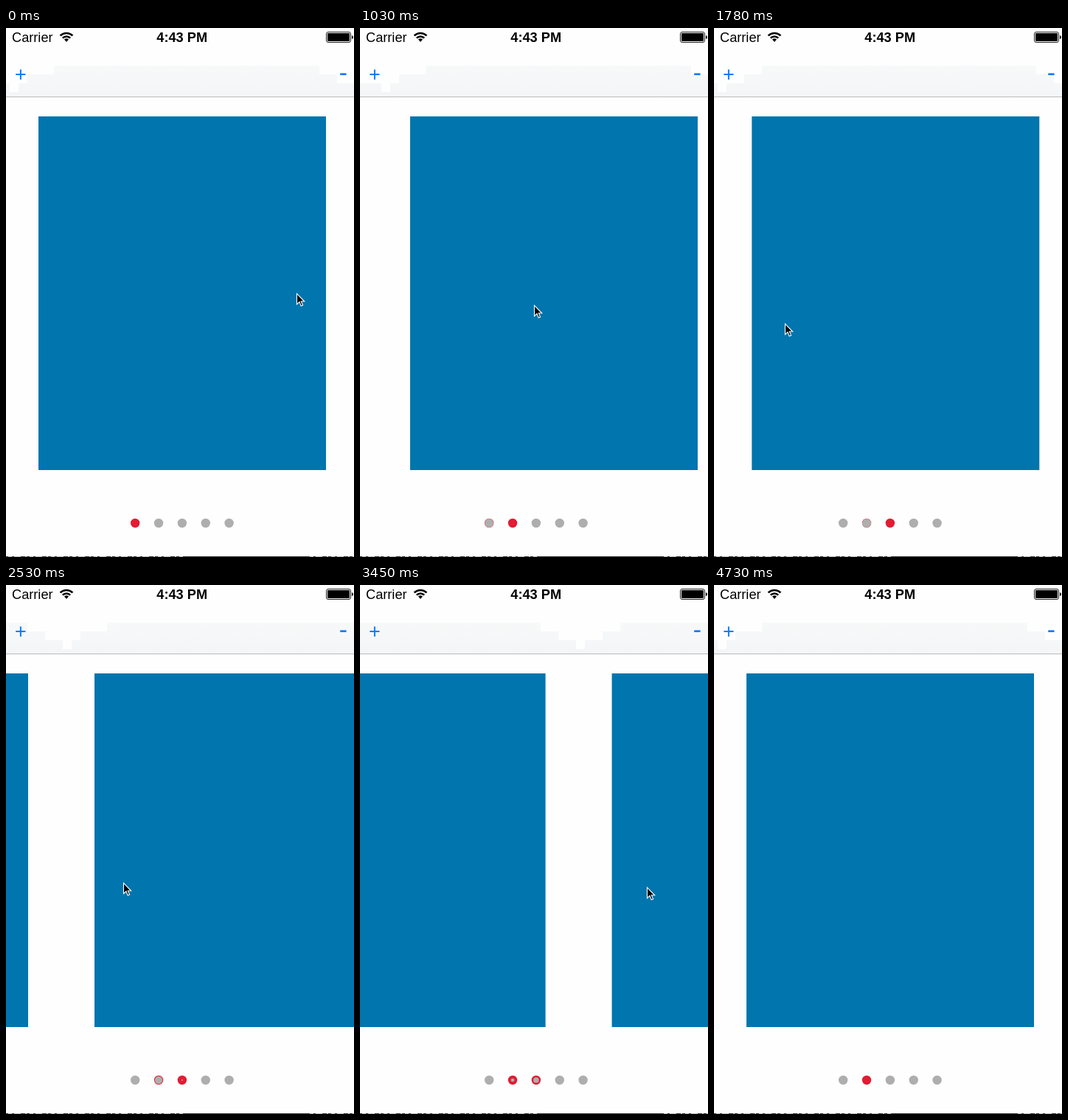
Write an HTML page that moves like this. It is 472 px wide and 718 px high and loops after 4830 ms.

```html
<!DOCTYPE html>
<html lang="en">
<head>
<meta charset="utf-8">
<title>Paged cards</title>
<style>
  html, body { margin: 0; width: 100%; height: 100%; overflow: hidden; background: #fefefe; }
  svg { display: block; }
  text { font-family: "Liberation Sans", Arial, sans-serif; font-size: 18.2px; }
  .button { fill: #007aff; text-anchor: middle; }
  .card { fill: #0075ae; }
  .ring { fill: #e31b33; }
  .core { fill: #aeaeae; }
</style>
</head>
<body>
<svg width="472" height="718" viewBox="0 0 472 718">
  <defs>
    <linearGradient id="bar" x2="0" y2="1">
      <stop stop-color="#f7f9f9"/>
      <stop offset="1" stop-color="#f3f5f7"/>
    </linearGradient>
  </defs>
  <rect width="472" height="718" fill="#fefefe"/>
  <g id="cards"></g>

  <rect y="51" width="472" height="42" fill="url(#bar)"/>
  <path id="glow" fill="#fefefe"/>
  <rect y="93" width="472" height="1" fill="#b9bbbd"/>
  <text class="button" x="20" y="72" style="font-size:27px">+</text>
  <text class="button" x="457.5" y="71.5" style="font-size:34px">-</text>

  <text x="8" y="19">Carrier</text>
  <text x="238.7" y="19" text-anchor="middle" font-weight="bold">4:43 PM</text>
  <g fill="none" stroke="#000" stroke-width="2.6">
    <path d="M73.6 10.4a12 12 0 0 1 16.8 0M76.8 13.6a7.4 7.4 0 0 1 10.4 0"/>
    <path d="M79 15.6a4.3 4.3 0 0 1 6 0L82 18.9z" fill="#000" stroke="none"/>
  </g>
  <rect x="434.5" y="5.5" width="33" height="14" rx="2.5" fill="none" stroke="#222"/>
  <rect x="436" y="7" width="30" height="11" rx="1"/>
  <path d="M469 10q2 .5 2 2.5t-2 2.5z"/>

  <g id="dots"></g>
  <path d="M0 717.5H472" stroke="#333"/>
  <path d="M3 717.5H240M412 717.5H472" stroke="#bbb" stroke-dasharray="5 3 9 6 2 4"/>
  <path id="cursor" d="M.5 .5V15L4 11.8 6.2 17.3 8.6 16.3 6.3 11H10.7Z" stroke="#fff" stroke-width="1.1"/>
</svg>
<script>
const LOOP = 4830, START = 567, TICK = 57.5;
const PAGES = 5, PITCH = 480, CARD_X = 44;

// [tick, page position]
const pageKeys = [
  [0, 0], [2, .045], [4, .1833], [5, .42], [6, .7], [7, .88], [8, .95], [10, .993], [12, 1],
  [13, 1.03], [15, 1.1646], [16, 1.44], [17, 1.73], [18, 1.908], [20, 1.975], [24, 2], [30, 2],
  [31, 1.985], [34, 1.8417], [38, 1.729], [43, 1.55], [48, 1.429], [50, 1.38], [52, 1.28],
  [55, 1.075], [56, 1.03], [58, 1.002], [60, 1]
];
// [tick, x, y]
const cursorKeys = [
  [0, 402, 360], [2, 362, 363], [4, 303, 369], [6, 246, 374], [8, 236, 376], [12, 330, 380],
  [15, 249, 382], [17, 165, 390], [19, 120, 397], [24, 77, 404], [30, 76, 404], [34, 159, 404],
  [38, 214, 405], [43, 301, 406], [48, 359, 409], [55, 466, 413], [58, 490, 414]
];

// Monotone cubic through the given column of the keys
function sample(keys, k, col = 1) {
  const last = keys.length - 1;
  if (k <= keys[0][0]) return keys[0][col];
  if (k >= keys[last][0]) return keys[last][col];
  const i = keys.findIndex(key => key[0] > k) - 1;
  const slope = j => (keys[j + 1][col] - keys[j][col]) / (keys[j + 1][0] - keys[j][0]);
  const tangent = j => {
    if (j === 0 || j === last) return 0;
    const a = slope(j - 1), b = slope(j);
    return a * b > 0 ? 2 * a * b / (a + b) : 0;
  };
  const span = keys[i + 1][0] - keys[i][0], u = (k - keys[i][0]) / span, v = 1 - u;
  return keys[i][col] * (1 + 2 * u) * v * v + keys[i + 1][col] * u * u * (3 - 2 * u)
    + span * u * v * (tangent(i) * v - tangent(i + 1) * u);
}

function add(parent, name, attrs) {
  const el = document.createElementNS("http://www.w3.org/2000/svg", name);
  for (const key in attrs) el.setAttribute(key, attrs[key]);
  return document.getElementById(parent).appendChild(el);
}

const cards = document.getElementById("cards");
const glow = document.getElementById("glow");
const cursor = document.getElementById("cursor");
const dots = [];
for (let i = 0; i < PAGES; i++) {
  add("cards", "rect", { class: "card", x: CARD_X + i * PITCH, y: 120, width: 390, height: 480 });
  const at = { cx: 175.2 + i * 31.85, cy: 672, r: 6.2 };
  dots.push({ ring: add("dots", "circle", { ...at, class: "ring" }),
              core: add("dots", "circle", { ...at, class: "core" }) });
}

// Blocky light patches in the bar above each gap between cards
const snap = x => 5 + 12 * Math.round((x - 5) / 12);
function glowPath(scroll) {
  let d = "";
  for (let i = 0; i <= PAGES; i++) {
    const mid = i * PITCH - 1 - scroll;
    [[-51, 61], [-27, 29], [0, 13]].forEach(([left, right], row) => {
      d += `M${snap(mid + left)} ${51 + row * 12}H${snap(mid + right)}v12H${snap(mid + left)}z`;
    });
  }
  return d;
}

function cursorAt(t, k) {
  if (t < START) return [t < 90 ? 394 : t < 150 ? 398 : t < 330 ? 403 : 406, 360];
  return [sample(cursorKeys, k), sample(cursorKeys, k, 2)].map(Math.round);
}

function draw(now) {
  const t = now % LOOP;
  const k = Math.floor((t - START) / TICK);
  // The page indicator is back at the first dot when the loop restarts
  const page = sample(pageKeys, k);
  const scroll = page * PITCH;
  cards.setAttribute("transform", `translate(${-scroll.toFixed(1)})`);
  glow.setAttribute("d", glowPath(scroll));
  dots.forEach(({ ring, core }, i) => {
    const weight = Math.max(0, 1 - Math.abs(page - i));
    ring.setAttribute("visibility", weight > 0 ? "visible" : "hidden");
    core.setAttribute("r", 6.2 * (1 - weight));
  });
  cursor.setAttribute("transform", `translate(${cursorAt(t, k)})`);
  requestAnimationFrame(() => draw(performance.now()));
}
draw(0);
</script>
</body>
</html>
```
